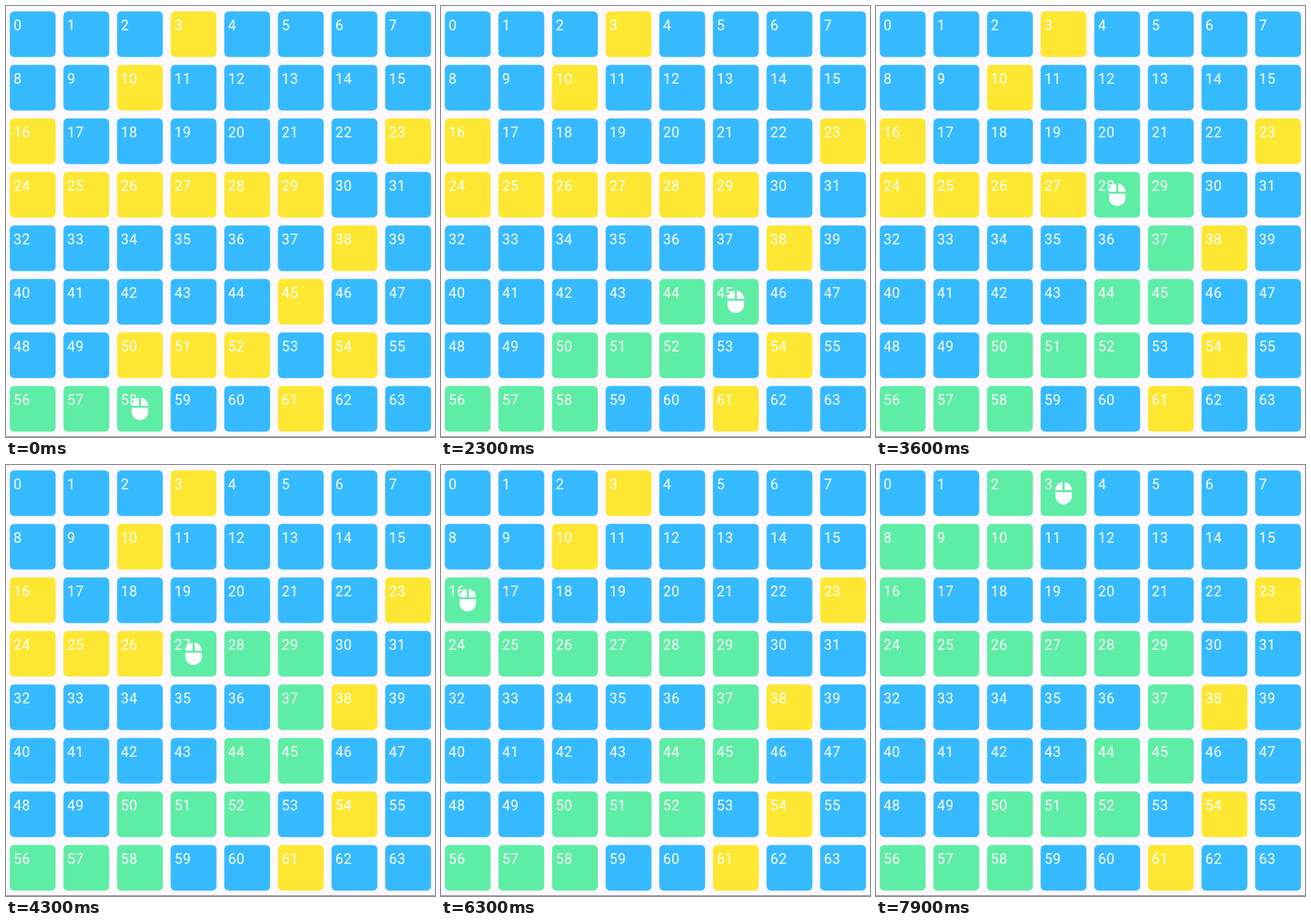
An HTML page for the animation above (8 s loop, 600 px wide and 604 px high).

```html
<!DOCTYPE html>
<html lang="en">
<head>
<meta charset="utf-8">
<title>Grid path</title>
<style>
html, body { margin: 0; width: 100%; height: 100%; overflow: hidden; background: #fdfaff; }
svg { display: block; width: 600px; height: 604px; }
text { font: 20px Roboto, sans-serif; letter-spacing: .35px; fill: #fff; }
</style>
</head>
<body>
<svg viewBox="0 0 600 604">
  <g id="grid"></g>
  <path id="mouse" fill="#fff" d="M13 1.07V9h7c0-4.08-3.05-7.44-7-7.93zM4 15c0 4.42 3.58 8 8 8s8-3.58 8-8v-4H4v4zm7-13.93C7.05 1.56 4 4.92 4 9h7V1.07z"/>
  <rect y="603" width="600" height="1" fill="#8b8a8d"/>
</svg>
<script>
const BLUE = '#36baff', YELLOW = '#fee732', GREEN = '#5eeda5';
const LOOP = 8000, COLS = 8, PITCH = 75, LEFT = 5.3, TOP = 7.4, SIZE = 64.1;

// The route starts in the bottom left cell and goes right, up or left.
const MOVE = { R: 1, U: -COLS, L: -1 };
const route = [56];
for (const dir of 'RRURRURUULLLLLUURRUR') route.push(route.at(-1) + MOVE[dir]);

// Yellow cells lie on rows and on diagonals.
const run = (first, step, count) => Array.from({ length: count }, (_, k) => first + k * step);
const yellow = new Set([
  run(3, 7, 2), run(16, 7, 2), run(24, 1, 6), run(38, 7, 3), run(50, 1, 2), run(54, 7, 2)
].flat());

// Pace: [ms, index on the route], even steps in between.
const pace = [[0, 2], [1300, 4], [2900, 9], [3500, 10], [3900, 11], [6200, 15], [7200, 20]];

function position(t) {
  const next = pace.findIndex(([at]) => at > t);
  if (next < 0) return route.length - 1;
  const [t0, i0] = pace[next - 1], [t1, i1] = pace[next];
  return i0 + Math.floor((t - t0) * (i1 - i0) / (t1 - t0));
}

const grid = document.getElementById('grid');
const mouse = document.getElementById('mouse');

function add(tag, attrs) {
  const el = document.createElementNS('http://www.w3.org/2000/svg', tag);
  for (const key in attrs) el.setAttribute(key, attrs[key]);
  return grid.appendChild(el);
}

const corner = i => [LEFT + i % COLS * PITCH, TOP + Math.floor(i / COLS) * PITCH];

const cells = run(0, 1, COLS * COLS).map(i => {
  const [x, y] = corner(i);
  const cell = add('rect', { x, y, width: SIZE, height: SIZE, rx: 6.2 });
  add('text', { x: x + 5.3, y: y + 26.9 }).textContent = i;
  return cell;
});

let shown = -1;

function draw(now) {
  const pos = position(now % LOOP);
  if (pos !== shown) {
    shown = pos;
    const visited = new Set(route.slice(0, pos + 1));
    cells.forEach((cell, i) => cell.setAttribute('fill',
      visited.has(i) ? GREEN : yellow.has(i) ? YELLOW : BLUE));
    const [x, y] = corner(route[pos]);
    mouse.setAttribute('transform',
      `translate(${x + SIZE / 2} ${y + SIZE / 2}) scale(1.44) translate(-12 -12)`);
  }
  requestAnimationFrame(draw);
}

draw(performance.now());
</script>
</body>
</html>
```
